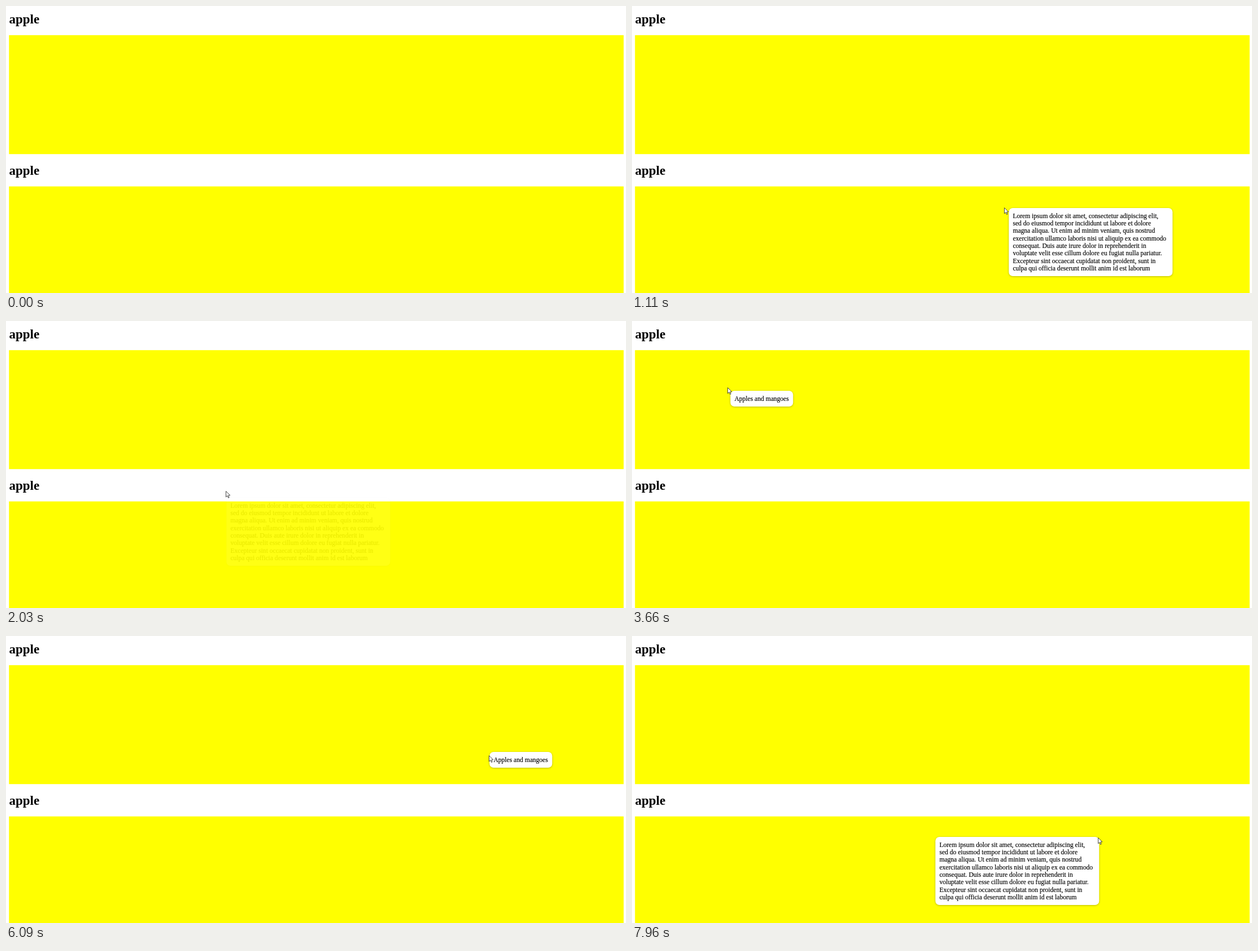
Recreate the animation shown at these times as an HTML page with a canvas. Size 1098 by 510 pixels, loop 8 s.

```html
<!DOCTYPE html>
<html lang="en">
<head>
<meta charset="utf-8">
<title>Tooltip follows pointer</title>
<style>
  html, body { margin: 0; width: 100%; height: 100%; overflow: hidden; background: #fff; }
  canvas { display: block; }
</style>
</head>
<body>
<canvas id="stage" width="1098" height="510"></canvas>
<script>
const ctx = document.getElementById('stage').getContext('2d');
const LOOP = 8000, LAG = 60, FADE = 140, FLIP_AT = 1090, PAD = 8;
const SERIF = '"Liberation Serif", "Times New Roman", serif';

// Pointer way-points: time, x, y
const path = [
  [80, 850, 289], [450, 826, 355], [880, 692, 366], [1110, 659, 358],
  [1250, 638, 358], [1700, 402, 336], [1950, 391, 317], [2030, 389, 302],
  [2290, 386, 289], [2540, 386, 289], [3340, 201, 146], [3660, 169, 118],
  [3730, 163, 102], [4170, 190, 36], [4300, 260, 16], [4770, 629, 38],
  [4980, 671, 67], [5700, 860, 172], [6090, 855, 212], [6650, 843, 270],
  [7490, 831, 336], [7770, 827, 357], [7950, 827, 357], [7960, 825, 358]
];

const smooth = v => { v = Math.min(1, Math.max(0, v)); return v * v * (3 - 2 * v); };

function slope(i, axis) {
  if (i < 1 || i >= path.length - 1) return 0;
  const rate = (a, b) => (b[axis] - a[axis]) / (b[0] - a[0]);
  const before = rate(path[i - 1], path[i]), after = rate(path[i], path[i + 1]);
  return before * after <= 0 ? 0 : 2 * before * after / (before + after);
}

// Monotone cubic through the way-points
function pointerAt(t) {
  const last = path.length - 1;
  if (t <= path[0][0]) return path[0].slice(1);
  if (t >= path[last][0]) return path[last].slice(1);
  const i = path.findIndex(key => key[0] > t) - 1;
  const a = path[i], b = path[i + 1], span = b[0] - a[0], u = (t - a[0]) / span;
  return [1, 2].map(axis => a[axis] + (b[axis] - a[axis]) * smooth(u)
    + span * u * (1 - u) * ((1 - u) * slope(i, axis) - u * slope(i + 1, axis)));
}

// Each tooltip is rendered once, so that it fades as a whole
function makeTip(width, height, lines) {
  const image = document.createElement('canvas');
  image.width = width + 2 * PAD;
  image.height = height + 2 * PAD;
  const pen = image.getContext('2d');
  pen.translate(PAD, PAD);
  pen.save();
  pen.shadowColor = 'rgba(0, 0, 0, 0.3)';
  pen.shadowBlur = 3.5;
  pen.shadowOffsetY = 0.8;
  pen.fillStyle = '#fff';
  pen.beginPath();
  pen.roundRect(0.3, 0, width, height, 7.2);
  pen.fill();
  pen.restore();
  pen.font = '11.57px ' + SERIF;
  pen.lineWidth = 0.15;
  lines.forEach((line, i) => {
    const y = 17.7 + i * 13.35;
    pen.fillText(line, 7.4, y);
    pen.strokeText(line, 7.4, y);
  });
  return { image, width };
}

const panels = [
  { top: 51.8, bottom: 263.2, tip: makeTip(111, 28, ['Apples and mangoes']) },
  { top: 320.6, bottom: 532, tip: makeTip(290, 121, [
    'Lorem ipsum dolor sit amet, consectetur adipiscing elit,',
    'sed do eiusmod tempor incididunt ut labore et dolore',
    'magna aliqua. Ut enim ad minim veniam, quis nostrud',
    'exercitation ullamco laboris nisi ut aliquip ex ea commodo',
    'consequat. Duis aute irure dolor in reprehenderit in',
    'voluptate velit esse cillum dolore eu fugiat nulla pariatur.',
    'Excepteur sint occaecat cupidatat non proident, sunt in',
    'culpa qui officia deserunt mollit anim id est laborum'
  ]) }
];

// Find when the pointer enters and leaves each panel
function findVisits() {
  const visits = [];
  let current = null;
  for (let t = path[0][0]; t < LOOP; t += 5) {
    const y = pointerAt(t)[1];
    const panel = panels.find(p => y >= p.top && y < p.bottom);
    if (current && current.panel !== panel) {
      current.leave = t;
      current = null;
    }
    if (panel && !current) {
      current = { panel, enter: t, leave: Infinity };
      visits.push(current);
    }
  }
  return visits;
}
const visits = findVisits();

function drawPage() {
  ctx.fillStyle = '#fff';
  ctx.fillRect(0, 0, 1098, 510);
  ctx.font = 'bold 23px ' + SERIF;
  for (const { top, bottom } of panels) {
    ctx.fillStyle = '#000';
    ctx.fillText('apple', 5.5, top - 21);
    ctx.fillStyle = '#ff0';
    ctx.fillRect(5.3, top, 1088.5, bottom - top);
  }
}

function drawTip({ panel, enter, leave }, t) {
  const alpha = smooth((t - enter) / FADE) * (1 - smooth((t - leave) / FADE));
  if (alpha <= 0) return;
  const { image, width } = panel.tip;
  let [x, y] = pointerAt(Math.min(t, leave + 2 * LAG) - LAG);
  if (x + width > FLIP_AT) x -= width;
  ctx.globalAlpha = alpha;
  ctx.drawImage(image, Math.round(x) - PAD, Math.round(y) - PAD);
  ctx.globalAlpha = 1;
}

const arrow = new Path2D('M0 0V16L3.8 12.6L6.4 18.4L8.8 17.4L6.3 11.6L11.4 11.4Z');

function drawPointer(t) {
  const [x, y] = pointerAt(t);
  ctx.save();
  ctx.translate(x + 0.6, y + 0.6);
  ctx.scale(0.64, 0.64);
  ctx.fillStyle = '#fff';
  ctx.fill(arrow);
  ctx.lineWidth = 1.2;
  ctx.strokeStyle = '#111';
  ctx.stroke(arrow);
  ctx.restore();
}

const start = performance.now();
function render() {
  const t = (performance.now() - start) % LOOP;
  drawPage();
  visits.forEach(visit => drawTip(visit, t));
  if (t >= path[0][0]) drawPointer(t);
  requestAnimationFrame(render);
}
render();
</script>
</body>
</html>
```
